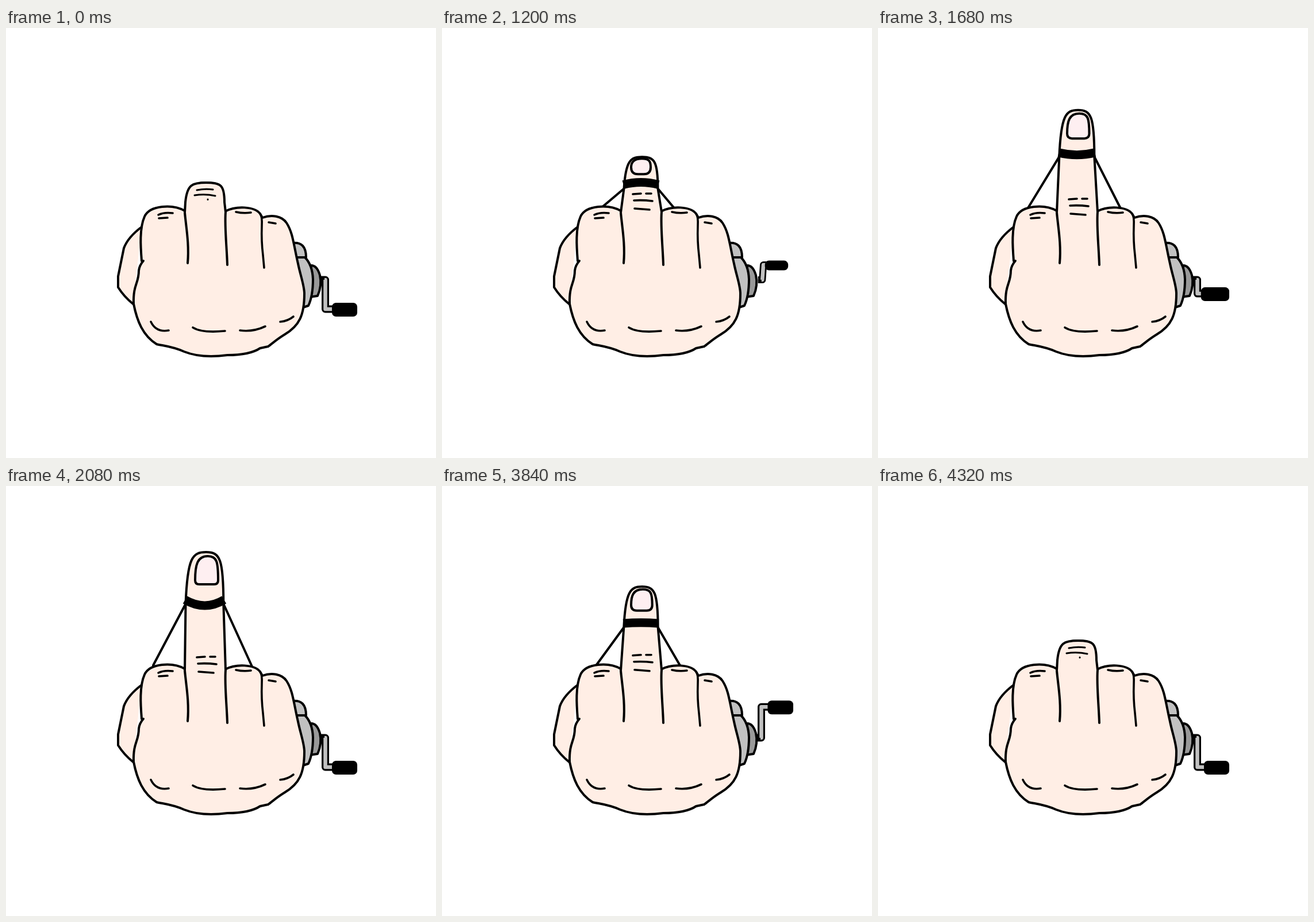
These frames come from a looping animation (748 px wide and 748 px high, 5.28 s). An HTML page with a canvas:

```html
<!DOCTYPE html>
<html lang="en">
<head>
<meta charset="utf-8">
<title>Crank hand</title>
<style>
  html, body { margin: 0; width: 100%; height: 100%; overflow: hidden; background: #fff; }
  canvas { display: block; width: 100vmin; height: 100vmin; }
</style>
</head>
<body>
<canvas id="stage" width="748" height="748"></canvas>
<script>
const ctx = document.getElementById('stage').getContext('2d');
const LOOP = 5280, STEP = 80;
const SKIN = '#ffeee5', NAIL = '#feeff1', LIGHT = '#c1c1c1', DARK = '#999';

// Extension at which the fingertip has cleared the knuckle, and full travel in pixels
const CLEAR = .29, TRAVEL = 154;

const cues = [
  { ms: 0, extension: 0, turns: 0 },
  { ms: 560, extension: 0, turns: 0 },
  { ms: 1200, extension: .29, turns: .327 },
  { ms: 1680, extension: .82, turns: .831 },
  { ms: 2080, extension: 1, turns: 1 },
  { ms: 3440, extension: 1, turns: 1 },
  { ms: 3520, extension: 1, turns: .93 },
  { ms: 3840, extension: .61, turns: .515 },
  { ms: 4000, extension: .26, turns: .33 },
  { ms: 4320, extension: 0, turns: 0 },
  { ms: LOOP, extension: 0, turns: 0 }
];

const thumb = new Path2D('M236 346Q212 364 205 383L195 432V451Q205 467 221 480');
const palm = new Path2D(`M236 405C234 380 232 348 241 328C250 308 290 306 311 318L381 319
  C400 309 432 310 442 323L446 330C462 324 480 327 488 339C499 356 500 375 508 410
  C512 430 519 448 519 462C519 500 510 518 485 533C470 542 462 550 456 554L442 557
  C430 565 410 569 385 569C355 573 330 571 310 563C290 554 275 553 262 550
  C238 535 228 510 222 480C221 445 231 445 231 422Q232 413 239 405`);
const wrinkles = new Path2D(`
  M442 323Q446 328 445 345Q444 370 447 395L449 417
  M265 325Q275 320 290 322M266 331L281 330
  M400 320Q413 323 426 321M457 338L469 340
  M252 511Q261 530 283 526M325 521Q341 531 381 527
  M407 526Q430 529 451 519M477 511Q490 510 500 502`);
const reel = [
  [LIGHT, 'M498 374Q522 371 522 399H500Z'],
  [DARK, 'M531 413Q541 413 546 430Q550 448 542 466L528 468Z'],
  [LIGHT, 'M504 399H520Q533 412 534 437Q534 466 526 483L514 487Z']
].map(([color, d]) => [color, new Path2D(d)]);

const lerp = (a, b, k) => a + (b - a) * k;

function stroke(path, width = 4, color = '#000') {
  ctx.lineWidth = width;
  ctx.strokeStyle = color;
  ctx.stroke(path);
}

function shape(path, fill) {
  ctx.fillStyle = fill;
  ctx.fill(path);
  stroke(path);
}

// Rounded end of a finger as path data
function dome(left, right, base, top) {
  const h = base - top;
  return `${left} ${base}C${left + 3} ${base - .9 * h} ${left + 12} ${top} 348 ${top}
    C${right - 6} ${top} ${right} ${base - .87 * h} ${right} ${base}`;
}

const finger = end => new Path2D(
  `M316 409C319 375 313 345 311 321L${end}L382 320C380 345 384 380 385 412`);

function drawCrank(turns) {
  const angle = turns * 2 * Math.PI;
  const y = 437.5 + 52.5 * Math.cos(angle), depth = Math.sin(angle);
  const far = Math.max(0, depth);
  const left = 567 - 6 * Math.abs(depth), right = 611 - 10 * far, height = 24 - 8 * far;
  const arm = new Path2D(`M${554 + 2 * far} 438h1.5L${555.5 + 4 * far} ${y - 1}H${left + 3}`);
  for (const [color, path] of reel) shape(path, color);
  ctx.lineCap = 'square';
  stroke(arm, 13 - far);
  ctx.lineCap = 'butt';
  stroke(arm, 6.5, LIGHT);
  ctx.lineCap = 'round';
  const grip = new Path2D();
  grip.roundRect(left, y - height / 2, right - left, height, 7);
  ctx.fillStyle = '#000';
  ctx.fill(grip);
}

// Geometry of the fingertip, which swells as it straightens
function tipAt(extension) {
  const swell = 4 * extension ** 6;
  return {
    rise: (extension - CLEAR) / (1 - CLEAR),
    left: 316.5 - swell, right: 375.5 + swell * .7,
    top: 269 - TRAVEL * extension, band: 303 - 105 * extension
  };
}

function drawStrings({ left, right, band }, drop, extension) {
  const y = band + 7 + drop;
  stroke(new Path2D(`M${left} ${y}L${287 - 31 * extension} 312
    M${right} ${y}L${395 + 33 * extension} 314`));
}

function drawNail({ rise, top }) {
  const x = 329, w = 34 + 6 * rise, h = 27 + 22 * rise, r = 12 - 5 * rise;
  const y = top + 3 + 4 * rise, right = x + w, bottom = y + h;
  shape(new Path2D(`M${x + r} ${bottom}Q${x} ${bottom} ${x} ${bottom - r}
    C${x} ${y + .3 * h} ${x + .1 * w} ${y} ${x + .55 * w} ${y}
    C${x + .95 * w} ${y} ${right} ${y + .2 * h} ${right} ${bottom - r}
    Q${right} ${bottom} ${right - r} ${bottom}Z`), NAIL);
}

function drawBand({ rise, left, right, band }) {
  const sag = 28 * rise ** 2 - 8;
  ctx.lineCap = 'butt';
  stroke(new Path2D(`M${left - 1} ${band}Q346 ${band + sag} ${right + 1} ${band}`), 15);
  ctx.lineCap = 'round';
}

function drawFinger(tip, drop, extension) {
  const end = dome(tip.left, tip.right, tip.band + 7, tip.top);
  ctx.save();
  ctx.translate(0, drop);
  shape(drop ? new Path2D('M' + end) : finger(end), SKIN);
  drawNail(tip);
  drawBand(tip);
  ctx.restore();
  if (drop) {
    const k = extension / CLEAR;
    shape(finger(dome(312 + 2 * k, 380 - k, 303 - 3 * k, 269 + 5 * k)), SKIN);
  }
}

function drawCreases(extension) {
  if (extension < .12) {
    const y = 282 + 40 * extension;
    stroke(new Path2D(`M332 ${y}q14 -3 28 -1M328 ${y + 9}q18 -3 36 1M351 ${y + 16}v.5`), 3);
    return;
  }
  const y = 288 + 9 * Math.min(1, (extension - CLEAR) / .5);
  stroke(new Path2D(`M332 ${y + 1}l14 -1M355 ${y}h9
    M334 ${y + 12}q16 -1 32 1M335 ${y + 26}l26 2`), 3.6);
}

function draw(ms) {
  const t = Math.floor(ms % LOOP / STEP) * STEP;
  const next = cues.findIndex(cue => cue.ms > t);
  const from = cues[next - 1], to = cues[next];
  const k = (t - from.ms) / (to.ms - from.ms);
  const extension = lerp(from.extension, to.extension, k);
  const tip = tipAt(Math.max(extension, CLEAR));
  const drop = Math.max(0, CLEAR - extension) * TRAVEL;

  ctx.fillStyle = '#fff';
  ctx.fillRect(0, 0, 748, 748);
  ctx.lineCap = ctx.lineJoin = 'round';
  drawCrank(lerp(from.turns, to.turns, k));
  if (extension > 0) drawStrings(tip, drop, extension);
  shape(thumb, SKIN);
  shape(palm, SKIN);
  stroke(wrinkles, 3.6);
  drawFinger(tip, drop, extension);
  drawCreases(extension);
}

const start = performance.now();
function tick() {
  draw(performance.now() - start);
  requestAnimationFrame(tick);
}
tick();
</script>
</body>
</html>
```
